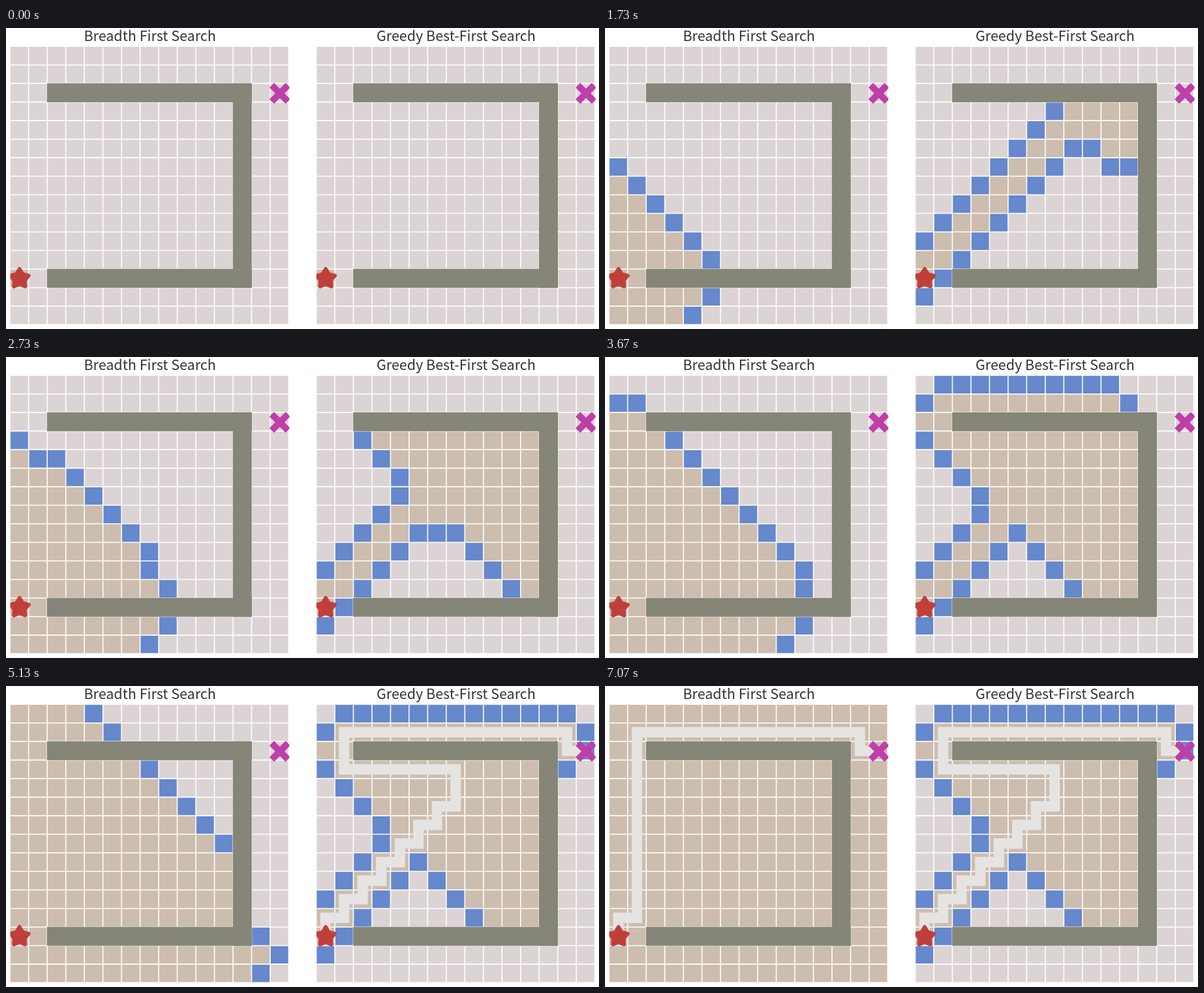
An HTML page with a canvas that plays this animation: 909x462 px, repeating every 7140 ms.

```html
<!DOCTYPE html>
<html lang="en">
<head>
<meta charset="utf-8">
<title>Search comparison</title>
<style>
  html, body { margin: 0; width: 100%; height: 100%; overflow: hidden; background: #fff; }
  canvas { display: block; width: 909px; height: 462px; }
</style>
</head>
<body>
<canvas id="stage" width="909" height="462"></canvas>
<script>
const ctx = document.getElementById('stage').getContext('2d');
const LOOP = 7140, TICK = 1000 / 15;
const N = 15, CELL = 28.48, TOP = 28.2;
const START = [0, 12], GOAL = [14, 2];
const COLORS = {
  floor: '#dcd4d4', visited: '#ccbdae', frontier: '#6688cc', wall: '#858578',
  path: '#e6e4e2', star: '#c13f3b', cross: '#bf3eaa', text: '#333'
};
const DIRS = [[1, 0], [0, 1], [-1, 0], [0, -1]];
// [tick, cells expanded so far]
const PACE = [[15, 0], [26, 26], [41, 58], [55, 85], [77, 133], [90, 159], [106, 194]];

const id = (x, y) => y * N + x;
const inside = (x, y) => x >= 0 && y >= 0 && x < N && y < N;
const isWall = (x, y) =>
  ((y === 2 || y === 12) && x >= 2 && x <= 12) || (x === 12 && y > 2 && y < 12);

// Alternating neighbour order makes straight-looking paths on a grid.
function neighbors(x, y) {
  const list = DIRS.map(([dx, dy]) => [x + dx, y + dy]);
  if ((x + y) % 2 === 0) list.reverse();
  return list.filter(([a, b]) => inside(a, b) && !isWall(a, b));
}

// Records at which step each cell is discovered and expanded.
function search(priority, stopAtGoal) {
  const seen = [], done = [], from = [];
  const goal = id(...GOAL);
  const queue = [{ pos: START, rank: 0 }];
  seen[id(...START)] = 0;
  for (let step = 1; queue.length; step++) {
    let best = 0;
    queue.forEach((q, i) => { if (q.rank < queue[best].rank) best = i; });
    const [x, y] = queue.splice(best, 1)[0].pos;
    done[id(x, y)] = step;
    for (const [a, b] of neighbors(x, y)) {
      const k = id(a, b);
      if (seen[k] !== undefined) continue;
      seen[k] = step;
      from[k] = [x, y];
      queue.push({ pos: [a, b], rank: priority(a, b) });
    }
    if (stopAtGoal && seen[goal] !== undefined) break;
  }
  done[id(...START)] = 0;
  const path = [];
  for (let p = GOAL; p; p = from[id(...p)]) path.unshift(p);
  return { seen, done, path, found: seen[goal] };
}

const toGoal = (x, y) => Math.abs(x - GOAL[0]) + Math.abs(y - GOAL[1]);
const panels = [
  { title: 'Breadth First Search', left: 6.2, run: search(() => 0, false) },
  { title: 'Greedy Best-First Search', left: 475.5, run: search(toGoal, true) }
];

function expandedAt(tick) {
  if (tick <= PACE[0][0]) return 0;
  for (let i = 1; i < PACE.length; i++) {
    const [t0, n0] = PACE[i - 1], [t1, n1] = PACE[i];
    if (tick <= t1) return Math.round(n0 + (n1 - n0) * (tick - t0) / (t1 - t0));
  }
  return PACE[PACE.length - 1][1];
}

function drawStar(x, y) {
  ctx.beginPath();
  for (let i = 0; i < 10; i++) {
    const a = i * Math.PI / 5 - Math.PI / 2, r = i % 2 ? 8.6 : 15;
    ctx.lineTo(x + r * Math.cos(a), y + r * Math.sin(a));
  }
  ctx.closePath();
  ctx.fillStyle = ctx.strokeStyle = COLORS.star;
  ctx.lineWidth = 5.5;
  ctx.lineJoin = 'round';
  ctx.fill();
  ctx.stroke();
}

function drawCross(x, y) {
  const r = 12.4;
  ctx.beginPath();
  ctx.moveTo(x - r, y - r);
  ctx.lineTo(x + r, y + r);
  ctx.moveTo(x + r, y - r);
  ctx.lineTo(x - r, y + r);
  ctx.strokeStyle = COLORS.cross;
  ctx.lineWidth = 10;
  ctx.stroke();
}

function drawPanel({ title, left, run }, n) {
  const px = x => left + x * CELL, py = y => TOP + y * CELL;
  const size = N * CELL;

  ctx.fillStyle = COLORS.text;
  ctx.font = '21.5px "Noto Sans CJK JP", "Noto Sans CJK SC", "Noto Sans CJK", "Noto Sans", sans-serif';
  ctx.textAlign = 'center';
  ctx.fillText(title, left + size / 2 + 0.8, 20);

  ctx.save();
  ctx.beginPath();
  ctx.rect(left + 0.3, TOP, size + 0.7, size + 0.5);
  ctx.clip();

  for (let y = 0; y < N; y++) {
    for (let x = 0; x < N; x++) {
      const k = id(x, y);
      ctx.fillStyle = run.done[k] <= n ? COLORS.visited
        : run.seen[k] <= n ? COLORS.frontier : COLORS.floor;
      ctx.fillRect(px(x), py(y), CELL, CELL);
    }
  }

  ctx.beginPath();
  for (let i = 0; i <= N; i++) {
    ctx.moveTo(px(i), TOP);
    ctx.lineTo(px(i), TOP + size);
    ctx.moveTo(left, py(i));
    ctx.lineTo(left + size, py(i));
  }
  ctx.strokeStyle = '#fff';
  ctx.lineWidth = 1.6;
  ctx.stroke();

  ctx.fillStyle = COLORS.wall;
  const wall = (x, y, w, h) =>
    ctx.fillRect(px(x) - 0.3, py(y) - 0.3, w * CELL + 0.6, h * CELL + 0.6);
  wall(2, 2, 11, 1);
  wall(12, 2, 1, 11);
  wall(2, 12, 11, 1);

  if (n >= run.found) {
    ctx.beginPath();
    for (const [x, y] of run.path) ctx.lineTo(px(x + 0.5), py(y + 0.5));
    ctx.strokeStyle = COLORS.path;
    ctx.lineWidth = 16;
    ctx.lineJoin = 'miter';
    ctx.stroke();
  }

  drawStar(px(START[0] + 0.5) + 0.3, py(START[1] + 0.5) + 0.5);
  drawCross(px(GOAL[0] + 0.5) + 0.6, py(GOAL[1] + 0.5) + 0.9);
  ctx.restore();
}

function draw(now) {
  const tick = Math.floor((now % LOOP + 4) / TICK);
  const n = expandedAt(tick);
  ctx.fillStyle = '#fff';
  ctx.fillRect(0, 0, 909, 462);
  for (const panel of panels) drawPanel(panel, n);
}

const begin = performance.now();
function loop() {
  draw(performance.now() - begin);
  requestAnimationFrame(loop);
}
loop();
</script>
</body>
</html>
```
